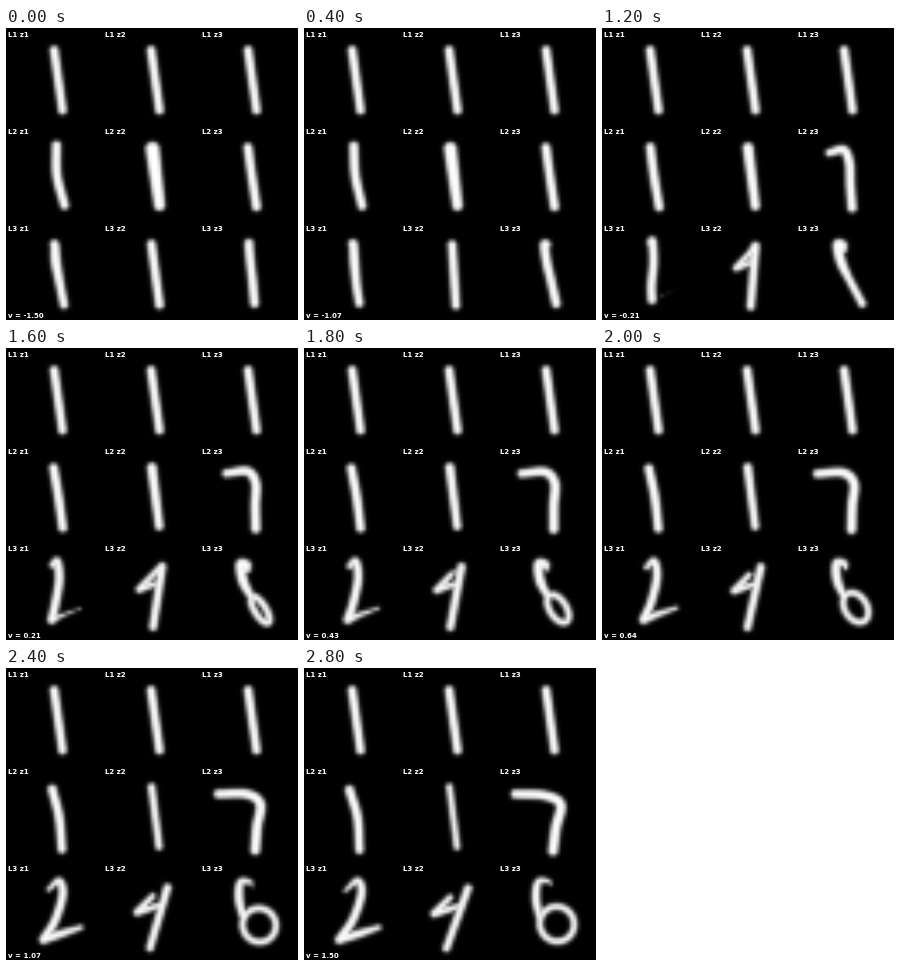
A matplotlib script for the animation above (3 s loop, 292 by 292 pixels).

```python
import numpy as np
import matplotlib.pyplot as plt
from matplotlib.animation import FuncAnimation

SIZE, CELL, FRAMES, STEP_MS = 292, 97, 15, 200
GRID, SOFT = 28, 0.95

# Digits are computed on a coarse grid and enlarged linearly.
centres = (np.arange(GRID) + .5) * 96 / GRID - .5
gx, gy = (g.ravel() for g in np.meshgrid(centres, centres))
enlarge = np.array([np.interp(np.arange(CELL), centres, unit)
                    for unit in np.eye(GRID)]).T


def ramp(i, start, end):
    return min(max((i - start) / (end - start), 0), 1)


def ease_out(t):
    return 1 - (1 - t) ** 2


def mix(a, b, t):
    return np.asarray(a, float) * (1 - t) + np.asarray(b, float) * t


def spline(pts, n=40):
    """Catmull-Rom samples through (x, y, radius) points."""
    pts = np.asarray(pts, float)
    p = np.vstack([2 * pts[0] - pts[1], pts, 2 * pts[-1] - pts[-2]])
    t = np.linspace(0, 1, n)[:, None]
    return np.vstack([
        b + .5 * t * (c - a + t * (2 * a - 5 * b + 4 * c - d + t * (3 * (b - c) + d - a)))
        for a, b, c, d in zip(p, p[1:], p[2:], p[3:])])


# Each cell returns its strokes at frame i; a negative radius fades a stroke out.

def bar(i):
    return [spline([(47.7, 22, 4.4), (56, 81.5, 4.3)])]


def bend(i):
    return [spline(mix([(50, 20, 4.5), (50.5, 50, 4.6), (58, 79.5, 4.4)],
                       [(45, 24.5, 4.5), (53, 52, 4.5), (55, 84, 4.3)], i / 14))]


def weight(i):
    return [spline(mix([(49, 23.5, 7), (56, 79.5, 5.6)],
                       [(48, 21.5, 3.3), (55.5, 81, 3.3)], i / 14))]


def seven(i):
    pts = mix([(47, 26, 3), (47.5, 22.5, 4.5), (49.5, 37, 4.5), (52.5, 58, 4.5), (56, 81, 4.5)],
              [(17, 28.5, 4.4), (46, 30, 4.7), (62, 39, 5), (57.5, 62, 5), (54.5, 85, 5)],
              ramp(i, 3, 14))
    pts[0] = mix((47, 26, 3), (17, 28.5, 4.4), ease_out(ramp(i, 3, 14)))
    return [spline(pts)]


def two(i):
    lean = [(48, 22, 4.5), (48.5, 25, 4.6), (49.5, 40, 5), (53.5, 62, 4.4), (57.5, 82, 4.2)]
    post = [(48.5, 20, 4), (50, 20, 4.4), (51, 40, 4.4), (49, 63, 4.4), (49.5, 77, 4.4)]
    curl = [(41, 28, 1.6), (53, 18.5, 3.6), (57, 31, 4.2), (48.5, 57, 4.2), (35, 77, 4.4)]
    body = mix(mix(lean, post, ramp(i, 0, 6)), curl, ramp(i, 6, 13))
    grow = ease_out(ramp(i, 4, 13))
    foot = [body[-1], mix((53, 79, -3), (55, 71, 4), grow), mix((72, 69, -6), (74, 65, 2.6), grow)]
    return [spline(body), spline(foot)]


def four(i):
    t = i / 14
    stem = mix([(48, 22, 4.5), (56, 82, 4.4)], [(66.5, 26, 4), (45, 85.5, 3.8)], t)
    grow = mix((0, 0, -8), (0, 0, 0), ramp(i, 2, 6))
    top = mix((52, 27, 3), (48.5, 35, 3), t) + grow
    tip = mix((40, 41, 3.2), (33, 51, 4), t) + grow
    end = mix((49, 36, 2.4), (60, 43, 2.8), t) + grow
    join = mix((0, 0, 0), (0, 0, -8), ramp(i, 8, 12))
    return [spline(stem), spline([top, tip]), spline([tip, end]),
            spline([stem[0] + grow + join, top + join])]


def six(i):
    lean, open_, curl = ramp(i, 0, 7), ramp(i, 6, 12.2), ramp(i, 7, 13)
    # the lower half is an ellipse that opens from a slanted line
    angle = np.radians(mix(85, 58, lean))
    long = mix(mix(11.5, 14.5, lean), 17.5, curl)
    u = np.array([np.cos(angle), np.sin(angle)])
    w = np.array([-u[1], u[0]])
    mid = mix(mix((53, 69), (60, 68.5), lean), (58.5, 61.5), curl)
    radius = mix(4.5, 3.4, ramp(i, 2, 9))

    def loop(phase):
        xy = mid + long * np.cos(phase) * u + 17 * open_ * np.sin(phase) * w
        return (*xy, radius)

    straight = [(48.5, 21, 4.5), (48.5, 22, 4.5), (48.5, 24, 4.5), (50, 40, 4.5)]
    blob = [(45, 27, 5), (45, 23, 5.2), (40, 23, 5.2), (44, 40, 5)]
    hook = [(53, 23, -.5), (50, 19, 2), (40, 19.5, 3.5), (37.5, 36, 4.2)]
    stem = mix(mix(straight, blob, lean), hook, curl)
    return [spline([*stem, loop(np.pi - .8 * curl)]),
            np.array([loop(p) for p in np.linspace(0, 2 * np.pi, 90)])]


CELLS = [[bar, bar, bar], [bend, weight, seven], [two, four, six]]


def draw_cell(shape, i):
    x, y, r = np.vstack(shape(i)).T[:, :, None]
    gap = (np.hypot(gx - x, gy - y) - r).min(axis=0)
    ink = 1 / (1 + np.exp(np.clip(gap / SOFT, -20, 20)))
    return enlarge @ ink.reshape(GRID, GRID) @ enlarge.T


def draw_stage(i):
    stage = np.zeros((SIZE, SIZE))
    stage[:3 * CELL, :3 * CELL] = np.block([[draw_cell(s, i) for s in row] for row in CELLS])
    return stage


fig = plt.figure(figsize=(SIZE / 100, SIZE / 100), dpi=100, facecolor="black")
ax = fig.add_axes([0, 0, 1, 1])
ax.axis("off")
picture = ax.imshow(np.zeros((SIZE, SIZE)), cmap="gray", vmin=0, vmax=1,
                    extent=(0, SIZE, SIZE, 0), interpolation="nearest", aspect="auto")


def label(x, y, text):
    return ax.text(x, y, text, color="white", family="DejaVu Sans",
                   weight="bold", size=5.04, va="baseline")


for row in range(3):
    for col in range(3):
        label(2 + CELL * col, 9 + CELL * row, f"L{row + 1} z{col + 1}")
value = label(2, 290, "")


def update(i):
    picture.set_data(draw_stage(i))
    # the tiny offset keeps the minus sign on the middle value
    value.set_text(f"v = {-1.5 + 3 * i / (FRAMES - 1) - 1e-9:.2f}")
    return picture, value


anim = FuncAnimation(fig, update, frames=FRAMES, interval=STEP_MS,
                     repeat=True, repeat_delay=0)
plt.show()
```
